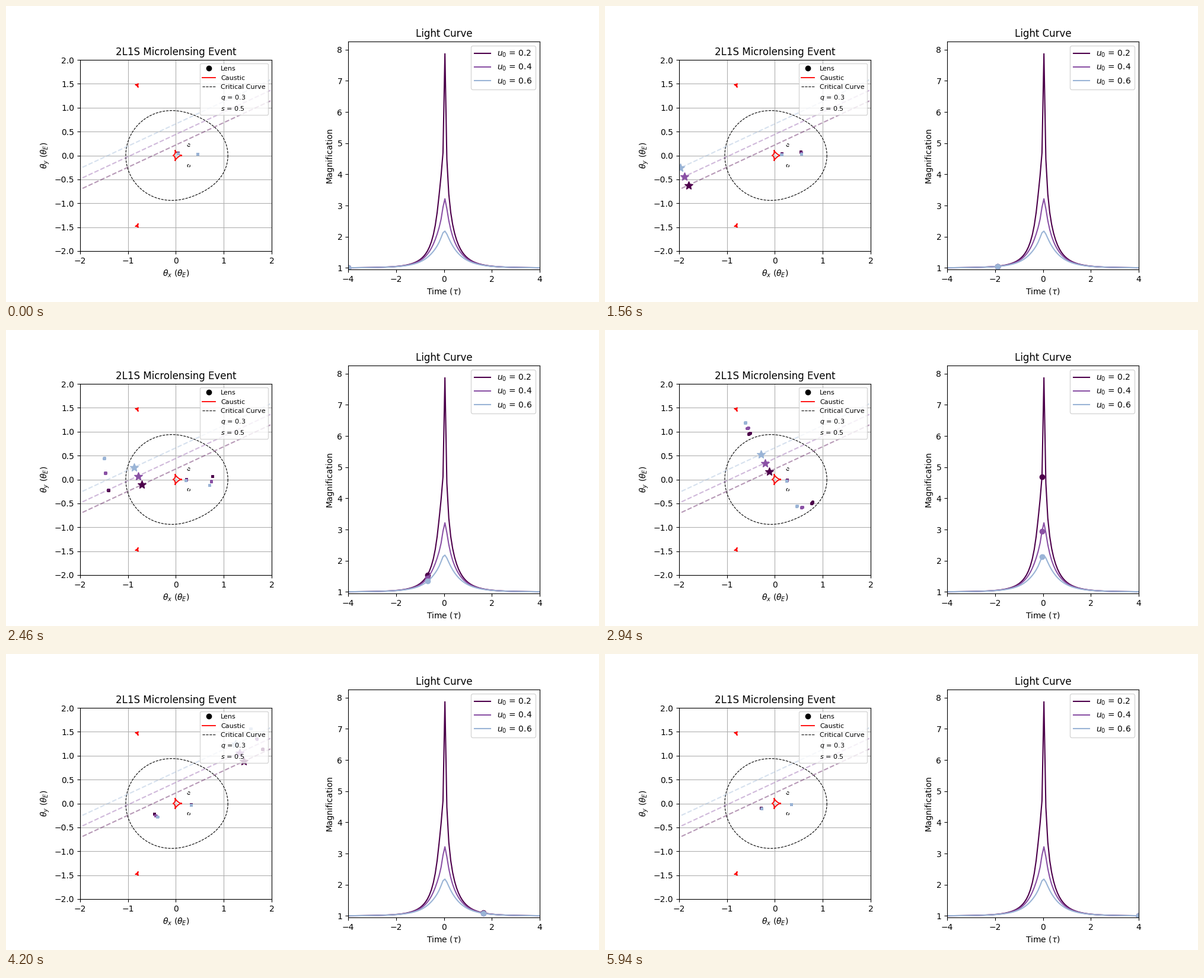
Write a matplotlib script that moves like this. It is 1000 by 500 pixels and loops after 6000 ms.

```python
import numpy as np
import matplotlib.pyplot as plt
from matplotlib.animation import FuncAnimation

Q, S = 0.3, 0.5
ALPHA = np.radians(25)
RHO = 0.005
FRAMES, INTERVAL = 100, 60
IMPACTS = (0.2, 0.4, 0.6)
COLORS = plt.cm.BuPu([1.0, 0.7, 0.4])

# Two point masses on the real axis, centre of mass at the origin
MASSES = (1 / (1 + Q), Q / (1 + Q))
LENSES = (-Q * S / (1 + Q), S / (1 + Q))
FACTORS = [np.poly1d([1, -x]) for x in LENSES]
D = FACTORS[0] * FACTORS[1]
N = FACTORS[1] * MASSES[0] + FACTORS[0] * MASSES[1]


def to_source(z):
    return z - sum(m / np.conj(z - x) for m, x in zip(MASSES, LENSES))


def find_images(zeta):
    """Solve the lens equation as a quintic and drop the spurious roots."""
    zeta = complex(zeta)
    a, b = [D * (zeta.conjugate() - x) + N for x in LENSES]
    poly = np.poly1d([1, -zeta]) * a * b - D * (b * MASSES[0] + a * MASSES[1])
    z = poly.roots
    return z[abs(to_source(z) - zeta) < 1e-5]


def magnification(zeta):
    z = find_images(zeta)
    shear = sum(m / (z - x) ** 2 for m, x in zip(MASSES, LENSES))
    return np.sum(1 / abs(1 - abs(shear) ** 2))


def critical_roots(phase):
    poly = (FACTORS[1] ** 2 * MASSES[0] + FACTORS[0] ** 2 * MASSES[1]
            - D ** 2 * complex(np.cos(phase), np.sin(phase)))
    return poly.roots


def trace_curve(start, turns):
    points = [start]
    for phase in np.linspace(0, 2 * np.pi * turns, 400 * turns + 1)[1:]:
        roots = critical_roots(phase)
        points.append(roots[np.argmin(abs(roots - points[-1]))])
    return np.array(points)


def source_path(u0):
    return (tau + 1j * u0) * np.exp(1j * ALPHA)


tau = np.linspace(-4, 4, FRAMES)
paths = [source_path(u0) for u0 in IMPACTS]
curves = [np.array([magnification(z) for z in path]) for path in paths]
disc_edge = RHO * np.exp(1j * np.linspace(0, 2 * np.pi, 24, endpoint=False))

roots = critical_roots(0)
critical = [trace_curve(roots[np.argmax(roots.real)], 2),
            trace_curve(roots[np.argmax(roots.imag)], 1),
            trace_curve(roots[np.argmin(roots.imag)], 1)]

fig, (sky, chart) = plt.subplots(1, 2, figsize=(10, 5), dpi=100)
fig.subplots_adjust(wspace=0.4)

sky.set(xlim=(-2, 2), ylim=(-2, 2), aspect="equal",
        title="2L1S Microlensing Event",
        xlabel=r"$\theta_x$ ($\theta_E$)", ylabel=r"$\theta_y$ ($\theta_E$)")
sky.grid(True)
sky.plot([], [], "ko", label="Lens")
for i, z in enumerate(critical):
    beta = to_source(z)
    sky.plot(beta.real, beta.imag, "r-", lw=1.3, label="" if i else "Caustic")
for i, z in enumerate(critical):
    sky.plot(z.real, z.imag, "k--", lw=0.8, label="" if i else "Critical Curve")
sky.plot([], [], " ", label=f"$q$ = {Q}")
sky.plot([], [], " ", label=f"$s$ = {S}")

chart.set(xlim=(-4, 4), ylim=(0.95, 1.05 * np.max(curves)),
          title="Light Curve", xlabel=r"Time ($\tau$)", ylabel="Magnification")

stars, blobs, dots = [], [], []
for u0, path, curve, color in zip(IMPACTS, paths, curves, COLORS):
    sky.plot(path.real, path.imag, "--", color=color, alpha=0.4)
    blobs += sky.plot([], [], ".", color=color, ms=5)
    stars += sky.plot([], [], "*", color=color, ms=10)
    chart.plot(tau, curve, color=color, label=f"$u_0$ = {u0}")
    dots += chart.plot([], [], "o", color=color)

sky.legend(loc="upper right", fontsize=8)
chart.legend(loc="upper right")


def update(i):
    for path, curve, star, blob, dot in zip(paths, curves, stars, blobs, dots):
        center = path[i]
        star.set_data([center.real], [center.imag])
        z = np.concatenate([find_images(center + p) for p in disc_edge])
        blob.set_data(z.real, z.imag)
        dot.set_data([tau[i]], [curve[i]])
    return stars + blobs + dots


anim = FuncAnimation(fig, update, frames=FRAMES, interval=INTERVAL,
                     repeat=True, repeat_delay=0)
plt.show()
```
